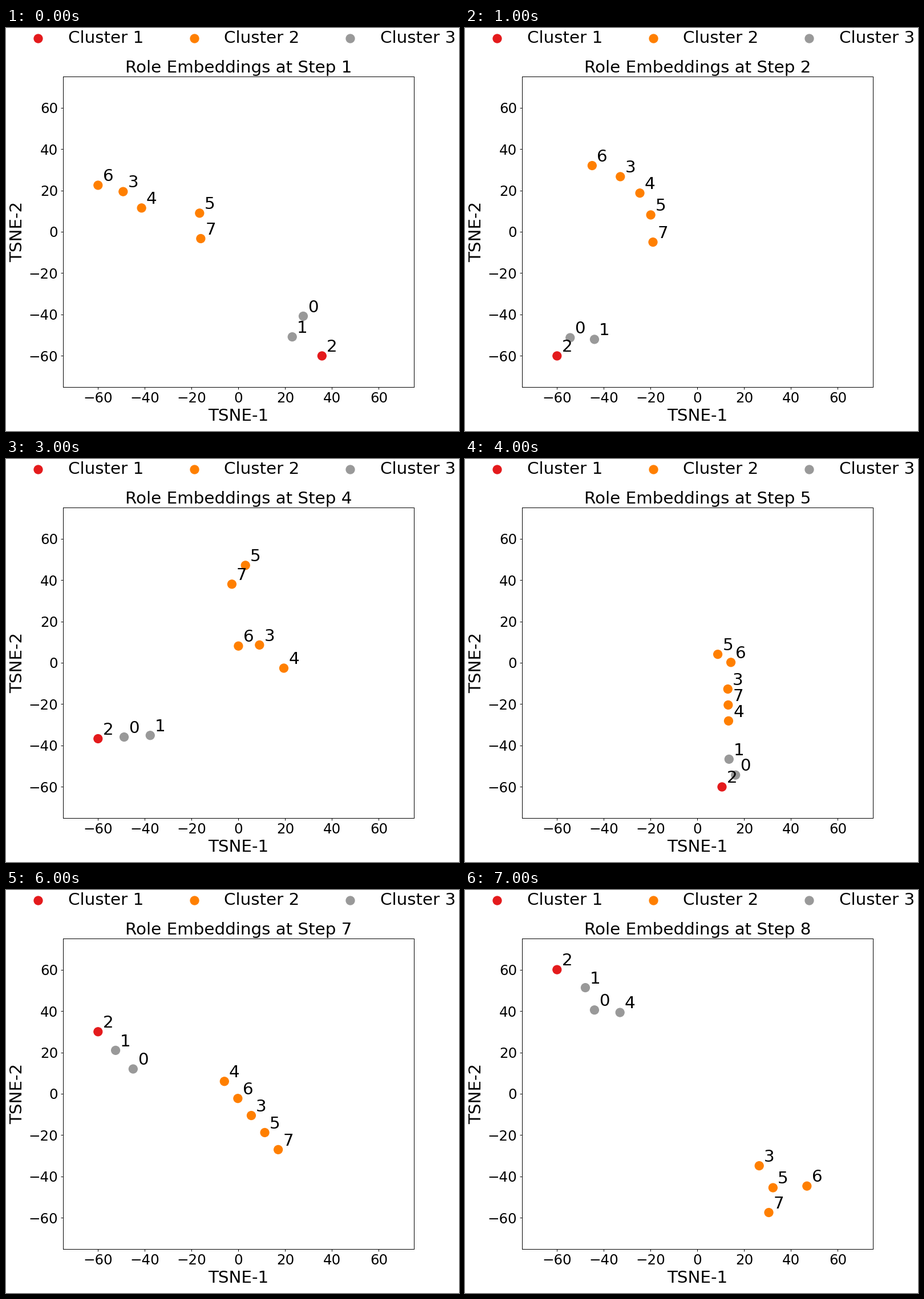
These frames come from a looping animation (794x706 px, 8000 ms). A matplotlib script:

```python
import matplotlib.pyplot as plt
import numpy as np
from matplotlib.animation import FuncAnimation

WIDTH, HEIGHT = 794, 706
DPI = 88.25
FONT = 24
SIZE = 150
RED, ORANGE, GREY = "#e41a1c", "#ff7f00", "#999999"
ROLES = 8


def chain(order, start, end=None, bend=0):
    """Place the named roles evenly on an arc from start to end."""
    end = start if end is None else end
    t = np.linspace(0, 1, len(order))
    arc = start + (end - start) * (t + 4j * bend * t * (1 - t))
    return dict(zip(map(int, order), arc))


# Each step is a few chains of neighbouring roles, x + yj in data units.
STEPS = [
    chain("634", -60 + 22.5j, -41.4 + 11.5j, 0.13)
    | chain("57", -16.6 + 9j, -16.1 - 3.3j)
    | chain("01", 27.7 - 40.8j, 23 - 50.8j) | chain("2", 35.7 - 60j),

    chain("63457", -45 + 32j, -19 - 5j, 0.2)
    | chain("201", -60 - 60j, -44 - 52j, 0.3),

    chain("634", -31.1 + 40.7j, -10.5 + 41.6j, -0.06)
    | chain("75", -21.6 + 12.4j, -19.5 + 3.2j)
    | chain("01", -57.1 - 43.6j, -49.4 - 47.1j) | chain("2", -60 - 60j),

    chain("57", 3 + 47.1j, -2.8 + 38j)
    | chain("63", 8.1j, 9 + 8.6j) | chain("4", 19.4 - 2.6j)
    | chain("201", -60 - 36.7j, -37.7 - 35.1j),

    chain("56", 8.7 + 4.1j, 14.3 + 0.2j)
    | chain("374", 13 - 12.7j, 13.3 - 28.1j)
    | chain("102", 13.5 - 46.6j, 10.5 - 60j, 0.32),

    chain("65734", -37.6 + 55.8j, -12.8 + 3.9j)
    | chain("10", -13.3 - 40j, 24.8 - 44j) | chain("2", 20.7 - 60j),

    chain("46357", -6 + 6j, 17 - 27j)
    | chain("210", -60 + 30j, -45 + 12j),

    chain("21", -60 + 60j, -47.9 + 51.3j)
    | chain("04", -44 + 40.5j, -33.1 + 39.3j)
    | chain("357", 26.4 - 34.8j, 30.5 - 57.4j, 0.17)
    | chain("6", 46.8 - 44.6j),
]

fig, ax = plt.subplots(figsize=(8.9972, 8), dpi=DPI)
fig.subplots_adjust(left=99.8 / WIDTH, right=715 / WIDTH,
                    bottom=1 - 628.8 / HEIGHT, top=1 - 85.2 / HEIGHT)
ticks = range(-60, 61, 20)
ax.set(xlim=(-75, 75), ylim=(-75, 75), xticks=ticks, yticks=ticks)
ax.tick_params(labelsize=20)
ax.set_xlabel("TSNE-1", fontsize=FONT)
ax.set_ylabel("TSNE-2", fontsize=FONT)
title = ax.set_title("", fontsize=FONT)

for k, color in enumerate((RED, ORANGE, GREY), 1):
    ax.scatter([], [], s=SIZE, color=color, label=f"Cluster {k}")
ax.legend(loc="lower center", bbox_to_anchor=(0.5, 1.05), ncol=3,
          fontsize=FONT, frameon=False)

dots = ax.scatter(np.zeros(ROLES), np.zeros(ROLES), s=SIZE)
labels = [ax.text(0, 0, str(role), fontsize=FONT) for role in range(ROLES)]


def role_colors(step):
    colors = [GREY, GREY, RED] + [ORANGE] * 5
    if step == len(STEPS) - 1:
        colors[4] = GREY  # role 4 joins the third cluster
    return colors


def draw(step):
    places = [STEPS[step][role] for role in range(ROLES)]
    title.set_text(f"Role Embeddings at Step {step + 1}")
    dots.set_offsets([(p.real, p.imag) for p in places])
    dots.set_color(role_colors(step))
    for label, p in zip(labels, places):
        label.set_position((p.real + 2, p.imag + 2))
    return [title, dots, *labels]


anim = FuncAnimation(fig, draw, frames=len(STEPS), interval=1000, repeat=True)
plt.show()
```
